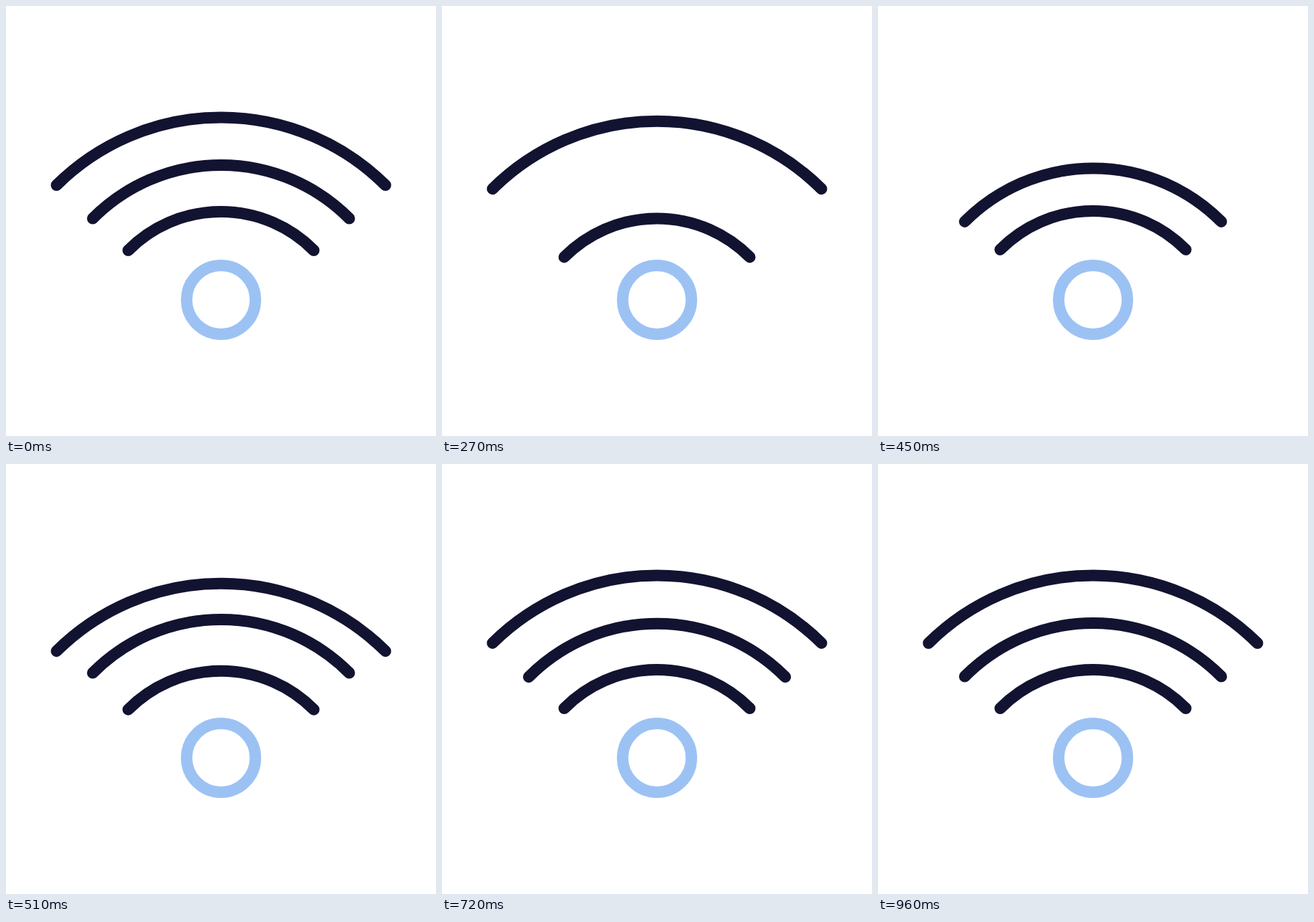
Recreate the animation shown at these times as an HTML page. Size 600 by 600 pixels, loop 3.05 s.

```html
<!DOCTYPE html>
<html lang="en">
<head>
<meta charset="utf-8">
<title>Wireless signal</title>
<style>
  html, body { margin: 0; width: 100%; height: 100%; overflow: hidden; background: #fff; }
  svg { display: block; width: 100%; height: 100%; fill: none; stroke: #121331; stroke-width: 16; stroke-linecap: round; }
  circle { stroke: #9cc2f4; }
</style>
</head>
<body>
<svg viewBox="0 0 600 600">
  <path d="M170.5 341A182.3 182.3 0 0 1 429.5 341"/>
  <path d="M121 296.5A252.3 252.3 0 0 1 479 296.5"/>
  <path d="M70.5 250A325.9 325.9 0 0 1 529.5 250"/>
  <circle cx="300" cy="410" r="48"/>
</svg>
<script>
  const LOOP = 3050, STEP = 30, SETTLED = 960;
  const VISIBLE = 125; // time from the start of the drop until the arc vanishes

  // drop, back: start times; depth: fall in px; swing: strength of the rebound
  const arcs = [
    { drop: 0, back: 225, depth: 10, swing: 0.55 },
    { drop: 90, back: 330, depth: 11, swing: 1 },
    { drop: 240, back: 480, depth: 11.5, swing: 1 }
  ];
  const paths = document.querySelectorAll('path');

  const mix = (a, b, p) => a + (b - a) * p;
  const wave = p => (1 - Math.cos(Math.PI * p)) / 2;

  function rebound(t, { depth, swing }) {
    const high = -5 * swing, low = 3 * swing;
    if (t < 180) return mix(depth, high, (t / 180) ** 2.2);
    if (t < 285) return mix(high, low, wave((t - 180) / 105));
    return low * Math.max(0, 1 - (t - 285) / 195) ** 2;
  }

  // Vertical offset of an arc, or null while it is hidden
  function offset(t, arc) {
    if (t >= arc.back) return rebound(t - arc.back, arc);
    const since = t - arc.drop;
    if (since >= VISIBLE) return null;
    const p = Math.min(1, Math.max(0, since / 100));
    return arc.depth * Math.sin(p * Math.PI / 2);
  }

  function draw(now) {
    const time = now % LOOP;
    const t = Math.min(SETTLED, Math.floor(time / STEP) * STEP);
    arcs.forEach((arc, i) => {
      const y = offset(t, arc);
      paths[i].setAttribute('visibility', y === null ? 'hidden' : 'visible');
      paths[i].setAttribute('transform', `translate(0 ${(y || 0).toFixed(2)})`);
    });
  }

  const start = performance.now();
  function tick() {
    draw(performance.now() - start);
    requestAnimationFrame(tick);
  }
  tick();
</script>
</body>
</html>
```
